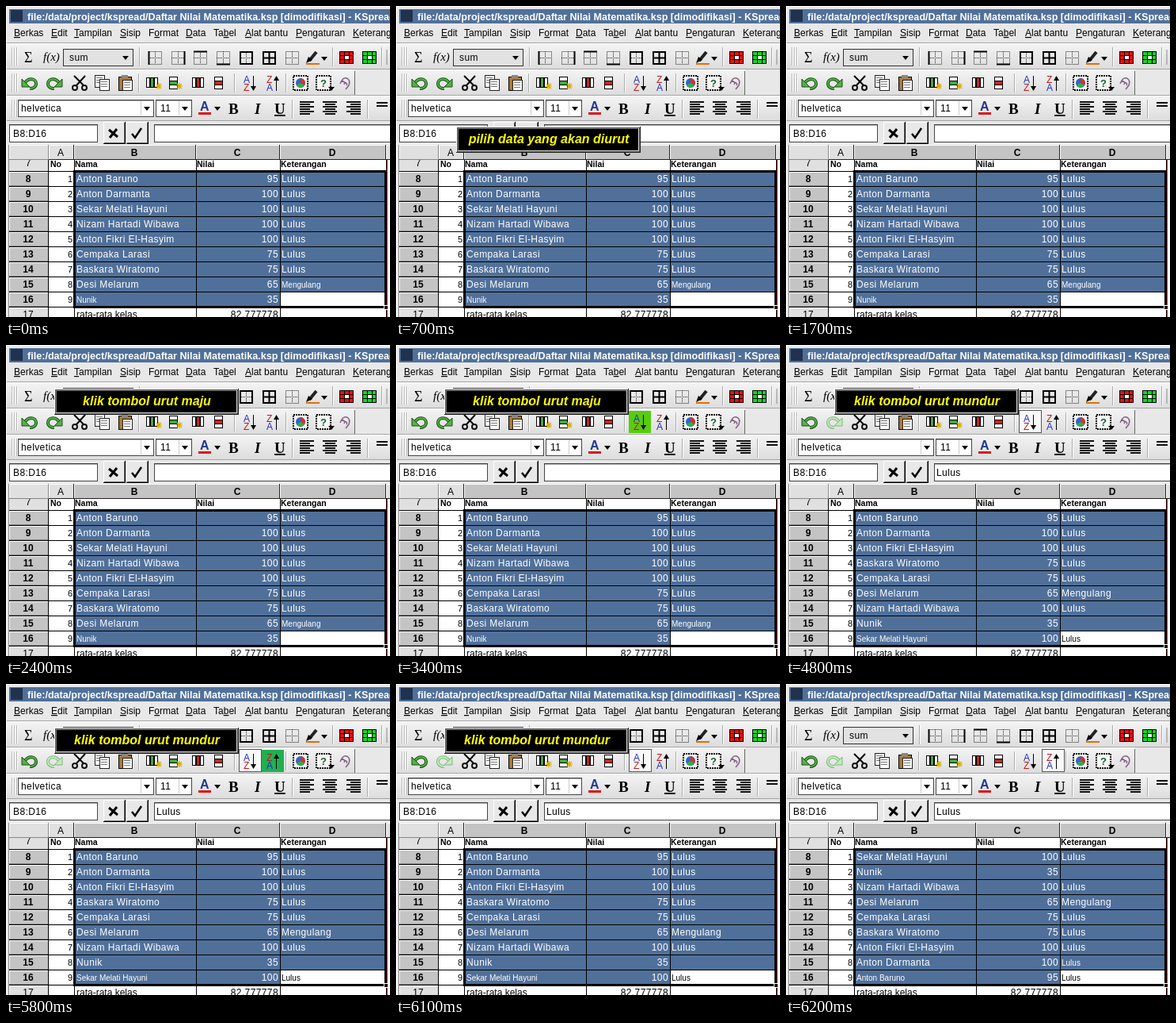
Recreate the animation shown at these times as an HTML page. Size 485 by 392 pixels, loop 7.2 s.

```html
<!DOCTYPE html>
<html lang="id">
<head>
<meta charset="utf-8">
<title>Mengurutkan data</title>
<style>
html, body { margin: 0; width: 100%; height: 100%; overflow: hidden; background: #e8e8e8; }
svg { display: block; width: 100vw; height: 100vh; }
text { font-family: "Liberation Sans", Arial, sans-serif; font-size: 12px; white-space: pre; }
.sp { letter-spacing: .4px; }
.b { font-weight: bold; }
.serif { font-family: "Liberation Serif", Times, serif; }
.tip { font: italic bold 16px "Liberation Sans", Arial, sans-serif; fill: #ff0; text-anchor: middle; }
</style>
</head>
<body>
<svg id="stage" viewBox="0 0 485 392" preserveAspectRatio="none"></svg>
<script>
const LOOP = 7200, BLINK = 100;
const people = [
  ["Anton Baruno", 95], ["Anton Darmanta", 100], ["Sekar Melati Hayuni", 100],
  ["Nizam Hartadi Wibawa", 100], ["Anton Fikri El-Hasyim", 100], ["Cempaka Larasi", 75],
  ["Baskara Wiratomo", 75], ["Desi Melarum", 65], ["Nunik", 35]
];
const ascending = [...people].sort((a, b) => a[0] < b[0] ? -1 : 1);
const descending = [...ascending].reverse();
const remark = mark => mark >= 75 ? "Lulus" : mark >= 50 ? "Mengulang" : "";

const rect = (x, y, w, h, fill, extra = "") =>
  `<rect x="${x}" y="${y}" width="${w}" height="${h}" fill="${fill}" shape-rendering="crispEdges" ${extra}/>`;
const frame = (x, y, w, h, fill = "none", stroke = "#000", sw = 1) =>
  rect(x + .5, y + .5, w - 1, h - 1, fill, `stroke="${stroke}" stroke-width="${sw}"`);
const path = (d, stroke = "#000", sw = 1, fill = "none", extra = "") =>
  `<path d="${d}" stroke="${stroke}" stroke-width="${sw}" fill="${fill}" ${extra}/>`;
const solid = (d, fill = "#000") => path(d, "none", 0, fill);
const text = (x, y, s, cls = "sp", extra = "") => `<text x="${x}" y="${y}" class="${cls}" ${extra}>${s}</text>`;
const hline = (x, y, w, c) => rect(x, y, w, 1, c);
const vline = (x, y, h, c) => rect(x, y, 1, h, c);
const at = (x, y, s) => `<g transform="translate(${x} ${y})">${s}</g>`;
const arrow = (x, y) => solid(`M${x - 4} ${y - 2}h8l-4 5z`);

function bevel(x, y, w, h, fill = "#eee", light = "#fff", dark = "#888") {
  return rect(x, y, w, h, fill) + hline(x, y, w, light) + vline(x, y, h, light) +
    hline(x, y + h - 1, w, dark) + vline(x + w - 1, y, h, dark);
}
const field = (x, y, w, h) => frame(x, y, w, h, "#fff", "#444") + hline(x + 1, y + 1, w - 2, "#aaa");
const separator = (x, y) => vline(x, y, 24, "#aaa") + vline(x + 1, y, 24, "#fff");

function toolbar(y, h, w) {
  let s = rect(0, y, w, h, "url(#bar)") + hline(0, y, w, "#fff") + hline(0, y + h - 1, w, "#a4a4a4");
  for (const x of [7, 10, 13]) s += vline(x, y + 5, h - 10, "#bbb") + vline(x + 1, y + 5, h - 10, "#fff");
  return s;
}

function titleAndMenu() {
  let s = rect(0, 0, 485, 47, "#e8e8e8") + hline(0, 0, 485, "#fff") + rect(4, 4, 481, 18, "#50709a") +
    rect(6, 5, 15, 15, "#20324e") +
    text(27, 18, "file:/data/project/kspread/Daftar Nilai Matematika.ksp [dimodifikasi] - KSpread", "b", 'fill="#fff" style="font-size:12.6px"') +
    hline(0, 46, 485, "#a4a4a4");
  const menu = [[10, "_Berkas"], [57, "_Edit"], [86, "_Tampilan"], [144, "_Sisip"], [180, "F_ormat"],
    [227, "_Data"], [262, "Ta_bel"], [302, "_Alat bantu"], [366, "_Pengaturan"], [438, "_Keterangan"]];
  for (const [x, label] of menu)
    s += text(x, 38, label.replace(/_(.)/, '<tspan text-decoration="underline">$1</tspan>'), "");
  return s;
}

// Cell border icon: dotted grid plus the solid lines given as path data
const borderIcon = (x, d) => at(x, 56,
  path("M1.5 1.5h16v16h-16zM9.5 1v16M1 9.5h16", "#222", 1, "none", 'stroke-dasharray="1 1"') + path(d, "#000", 2));
const tableIcon = (x, c) => at(x, 57,
  frame(0, 0, 18, 16, c) + path("M0 5.5h18M0 10.5h18M6.5 0v16M12.5 0v16") + rect(7, 6, 5, 4, "#fff"));

function formatBar() {
  return toolbar(47, 33, 485) +
    text(23, 71, "Σ", "serif", 'style="font-size:18px"') +
    text(47, 69, "f(x)", "serif", 'style="font-size:15px;font-style:italic"') +
    bevel(72, 54, 89, 22, "#e2e2e2") + frame(72, 54, 89, 22, "none", "#333") + text(80, 69, "sum") + arrow(151, 65) +
    separator(168, 52) +
    borderIcon(179, "M1.5 1v17") + borderIcon(208, "M17.5 1v17") + borderIcon(236, "M1 1.5h17") + borderIcon(265, "M1 17.5h17") +
    borderIcon(294, "M2 2h15v15h-15z") + borderIcon(323, "M2 2h15v15h-15zM9.5 1v16M1 9.5h16") + borderIcon(352, "") +
    path("M383 69l9-11", "#222", 4) + solid("M379 72l3-8 5 4z") +
    rect(379, 72, 17, 2, "#e07000") + arrow(402, 66) + separator(412, 52) +
    tableIcon(421, "#e81010") + tableIcon(450, "#10d820") + separator(474, 52) + path("M481 55v19", "#888");
}

const turn = (x, dir, color, edge) => `<g transform="translate(${x} 88) scale(${dir} 1)">` +
  path("M4 9C8 2 18 3 18 10 18 14 14 16 10 16", edge, 4) + path("M4 9C8 2 18 3 18 10 18 14 14 16 10 16", color, 2) +
  path("M0 4v10h10z", edge, 1, color) + "</g>";
const page = (x, y, w, h) => frame(x, y, w, h, "#fff", "#222") +
  [3, 6, 9].map(d => hline(x + 2, y + d, w - 5, "#777")).join("");
const columns = (x, c) => [0, 5, 10].map(d => frame(x + d, 90, 5, 13, d === 5 ? c : "#fff")).join("");
const rows = (x, c) => [0, 5, 10].map(d => frame(x, 89 + d, 11, 6, d === 5 ? c : "#fff")).join("");
const star = (x, y) => path(`M${x - 4} ${y}h8M${x} ${y - 4}v8M${x - 3} ${y - 3}l6 6M${x + 3} ${y - 3}l-6 6`, "#d8b000", 1.2);
const sortIcon = (x, top, bottom, c1, c2) =>
  text(x, 97, top, "", `fill="${c1}" style="font-size:12px"`) +
  text(x, 107, bottom, "", `fill="${c2}" style="font-size:12px"`) +
  (top === "A" ? path("M312.5 88v16") + solid("M309 101h7l-3.5 6z")
    : path("M341.5 91v16") + solid("M338 94h7l-3.5-6z"));
const dotted = x => path(`M${x} 88h18v18h-18z`, "#000", 2, "#f4f4f4", 'stroke-dasharray="2 1"');

function editBar() {
  return toolbar(80, 33, 441) + rect(441, 80, 44, 33, "#e8e8e8") + vline(440, 82, 30, "#666") + hline(441, 112, 44, "#a4a4a4") +
    turn(20, 1, "#58b048", "#145014") + '<g id="redo"></g>' +
    path("M86 88l12 12M100 88l-11 12", "#000", 2) +
    '<g fill="none" stroke="#111" stroke-width="2"><circle cx="87" cy="103" r="3"/><circle cx="99" cy="103" r="3"/></g>' +
    page(112, 87, 13, 16) + page(118, 92, 13, 15) +
    frame(142, 89, 17, 18, "#a87838") + rect(146, 87, 8, 4, "#888") + page(147, 93, 13, 14) +
    separator(167, 85) +
    columns(177, "#40a840") + star(193, 101) + rows(206, "#40a840") + star(219, 101) +
    columns(235, "#d02020") + rows(263, "#d02020") +
    separator(288, 85) +
    '<g id="sortButtons"></g>' +
    sortIcon(300, "A", "Z", "#2030c8", "#c01818") + sortIcon(329, "Z", "A", "#c01818", "#2030c8") +
    separator(353, 85) +
    dotted(363) + '<circle cx="372" cy="97" r="6" fill="#2868d0"/>' +
    solid("M372 97V91A6 6 0 0 1 377 100z", "#e03020") + solid("M372 97L377 100A6 6 0 0 1 367 100z", "#30b040") +
    dotted(392) + text(397, 102, "?", "b", 'fill="#186030" style="font-size:13px"') + arrow(411, 104) +
    path("M424 94C428 87 436 92 433 100L429 105M424 94l-2 4M424 94l5 3M427 99c1-4 5-2 3 1", "#806080", 1.5);
}

function align(x, offset) {
  return [0, 1, 2, 3, 4, 5].map(i => {
    const w = i % 2 ? 13 : 18;
    return rect(x + Math.round((18 - w) * offset), 120 + i * 3, w, 2, "#111");
  }).join("");
}

function fontBar() {
  const letter = (x, s, css) => text(x, 136, s, "serif b", `style="font-size:19px;${css}"`);
  return toolbar(113, 32, 485) +
    field(15, 118, 172, 22) + text(19, 133, "helvetica") + vline(170, 120, 18, "#ccc") + arrow(178, 129) +
    field(189, 118, 46, 22) + text(195, 133, "11") + vline(218, 120, 18, "#ccc") + arrow(226, 129) +
    text(245, 132, "A", "b", 'fill="#203890" style="font-size:16px"') + rect(243, 134, 16, 3, "#e01010") + arrow(267, 129) +
    letter(281, "B", "") + letter(314, "I", "font-style:italic") + letter(339, "U", "text-decoration:underline") +
    separator(361, 118) + align(371, 0) + align(400, .5) + align(430, 1) + separator(456, 118) +
    rect(468, 121, 14, 2, "#111") + rect(468, 125, 14, 2, "#111");
}

const button = x => bevel(x, 146, 28, 28, "#e8e8e8", "#fff", "#000") + rect(x + 1, 172, 26, 1, "#666") + rect(x + 26, 147, 1, 26, "#666");

function formulaBar() {
  return rect(0, 145, 485, 31, "#e8e8e8") + field(4, 149, 112, 23) + text(9, 165, "B8:D16") +
    button(123) + button(152) +
    path("M130 156l11 9M140 155l-9 11", "#000", 3) + path("M159 161l4 5 8-12", "#000", 2.5) +
    field(187, 149, 302, 23) + '<text id="formula" class="sp" x="190" y="165"></text>';
}

const rowTop = i => 208 + i * 19;
const base = i => rowTop(i) + 14;

function sheet() {
  let s = rect(0, 175, 485, 217, "#fff") + rect(0, 175, 4, 217, "#e8e8e8") + bevel(4, 175, 50, 19, "#e0e0e0");
  for (const [x, w, name] of [[54, 32, "A"], [86, 154, "B"], [240, 106, "C"], [346, 134, "D"], [480, 9, ""]]) {
    const chosen = name > "A";
    s += bevel(x, 175, w, 19, chosen ? "#c4c4c4" : "#e0e0e0", "#fff", "#222") +
      text(x + w / 2 - 1, 189, name, chosen ? "b" : "", 'text-anchor="middle"');
  }
  s += rect(4, 194, 50, 14, "#e0e0e0") +
    text(28, 202, "7", "", 'text-anchor="middle" clip-path="url(#below)"');
  for (const [x, label] of [[56, "No"], [87, "Nama"], [241, "Nilai"], [347, "Keterangan"]])
    s += text(x, 203, label, "b", 'style="font-size:10.5px"');
  s += rect(86, 208, 394, 171, "#50709a") + rect(347, rowTop(8), 132, 19, "#fff");
  for (let i = 0; i < 10; i++) {
    const y = rowTop(i), chosen = i < 9;
    s += bevel(4, y + 1, 50, 18, chosen ? "#c4c4c4" : "#e0e0e0") + hline(4, y, 476, "#000") +
      text(28, base(i), i + 8, chosen ? "b" : "", 'text-anchor="middle"');
    if (chosen) s += text(84, base(i), i + 1, "", 'text-anchor="end" style="font-size:11px"');
  }
  for (const x of [53, 240, 346, 480]) s += vline(x, 194, 198, "#000");
  s += vline(86, 194, 198, "#000") + vline(481, 194, 198, "#e02020") +
    rect(86.5, 208.5, 393, 171, "none", 'stroke="#000" stroke-width="3"') + frame(477, 377, 6, 6, "#000", "#fff") +
    text(89, 393, "rata-rata kelas", "") + text(344, 393, "82.777778", "sp", 'text-anchor="end"');
  return s + '<g id="cells"></g>';
}

function cells(list) {
  return list.map(([name, mark], i) => {
    const size = small => `style="font-size:${small ? 10 : 12}px;letter-spacing:${small ? 0 : .4}px"`;
    return text(89, base(i), name, "", `fill="#fff" ${size(i > 7)}`) +
      text(344, base(i), mark, "sp", 'fill="#fff" text-anchor="end"') +
      text(348, base(i), remark(mark), "", `fill="${i > 7 ? "#000" : "#fff"}" ${size(i > 6)}`);
  }).join("");
}

const tip = (x, y, s) => bevel(x, y, 233, 33, "#555", "#fff", "#222") +
  bevel(x + 2, y + 2, 229, 29, "#000", "#777", "#ddd") + text(x + 117, y + 21, s, "tip");

const stage = document.getElementById("stage");
stage.innerHTML = `<defs>
  <linearGradient id="bar" x2="0" y2="1"><stop stop-color="#f4f4f4"/><stop offset="1" stop-color="#dcdcdc"/></linearGradient>
  <clipPath id="below"><rect x="4" y="194" width="50" height="14"/></clipPath></defs>` +
  titleAndMenu() + formatBar() + editBar() + fontBar() + formulaBar() + sheet() +
  vline(0, 0, 392, "#fff") + vline(3, 175, 217, "#888") + '<g id="tip"></g>';

const last = {};
function put(id, markup) {
  if (last[id] === markup) return;
  last[id] = markup;
  document.getElementById(id).innerHTML = markup;
}

const sortButton = (x, green) => green ? rect(x, 83, 28, 28, green)
  : rect(x, 82, 29, 29, "#f8f8f8") + frame(x, 82, 29, 29, "none", "#555");

function draw(t) {
  const within = (a, b) => t >= a && t < b;
  const flash = a => within(a, a + 4 * BLINK) && Math.floor((t - a) / BLINK) % 2 === 0;
  const up = t >= 3800, down = t >= 6200;

  put("cells", cells(down ? descending : up ? ascending : people));
  put("formula", up ? "Lulus" : "");
  put("redo", up ? turn(71, -1, "#c8e8c0", "#78b878") : turn(71, -1, "#58b048", "#145014"));
  put("sortButtons",
    (flash(3400) ? sortButton(294, "#58cc10") : up && !down ? sortButton(294) : "") +
    (flash(5800) ? sortButton(323, "#20b050") : down ? sortButton(323) : ""));
  put("tip",
    within(700, 1700) ? tip(76, 152, "pilih data yang akan diurut") :
    within(2400, 3800) ? tip(61, 55, "klik tombol urut maju") :
    within(4800, 6200) ? tip(61, 55, "klik tombol urut mundur") : "");
}

const start = performance.now();
function tick() {
  draw((performance.now() - start) % LOOP);
  requestAnimationFrame(tick);
}
tick();
</script>
</body>
</html>
```
